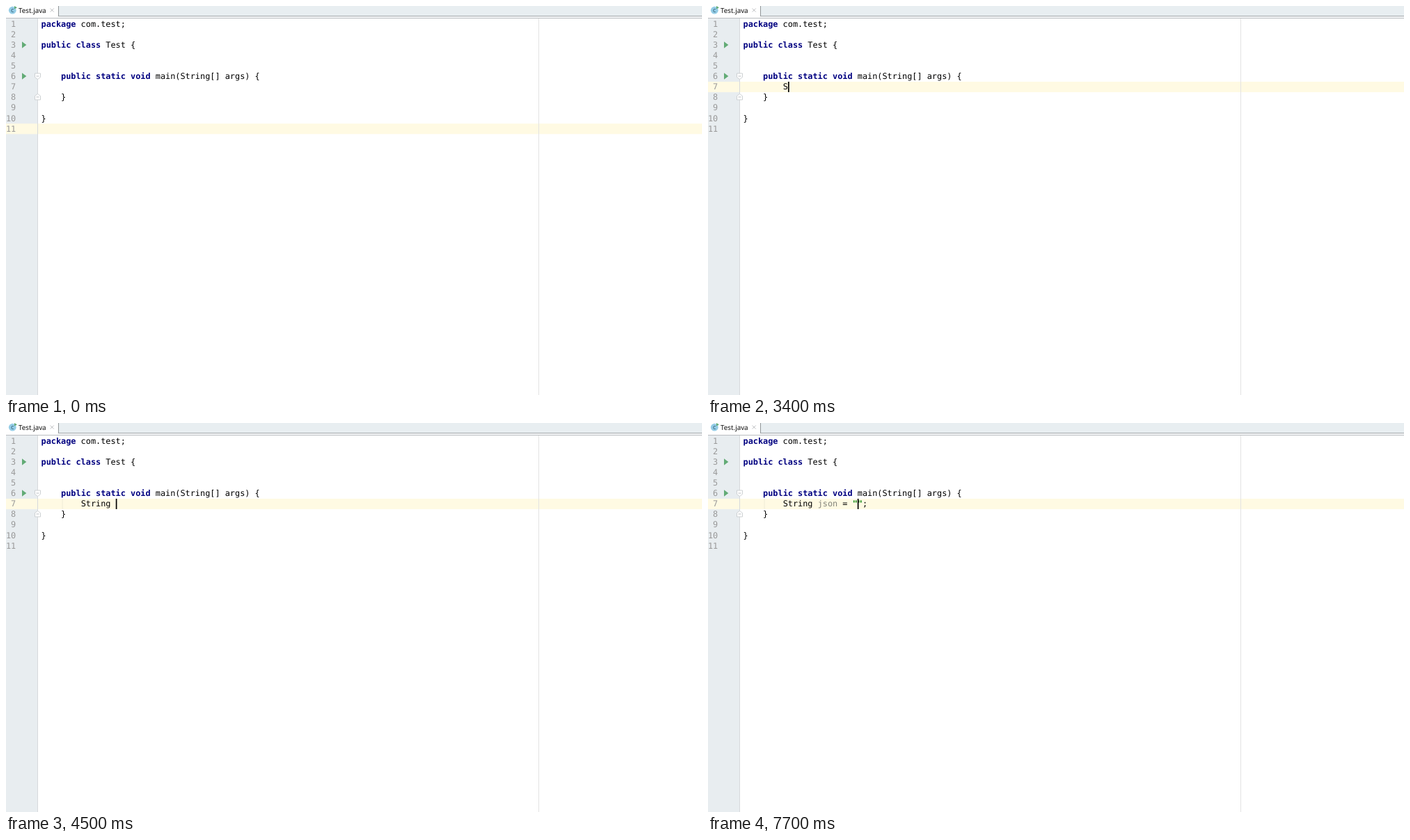
An HTML page that plays this animation: 1000x560 px, repeating every 8 s.

```html
<!DOCTYPE html>
<html lang="en">
<head>
<meta charset="utf-8">
<title>Code editor</title>
<style>
  html, body { margin: 0; width: 100%; height: 100%; overflow: hidden; background: #fff; }
  svg { display: block; width: 1000px; height: 560px; }
  text { white-space: pre; text-rendering: geometricPrecision; }
  .code { font: 11.87px "DejaVu Sans Mono", monospace; }
  .ui { font: 8.33px "Open Sans", "Noto Sans CJK SC", "Noto Sans CJK", sans-serif; }
  .tab { font-size: 9.9px; }
  .letter { font: bold 7px "Open Sans", sans-serif; text-anchor: middle; fill: #46758c; }
  .number { fill: #999; text-anchor: end; }
  .keyword { fill: #000080; font-weight: bold; }
  .string { fill: #008000; font-weight: bold; }
  .unused { fill: #85857c; }
  .match { fill: #b05cc4; }
  .package { fill: #b3bec8; }
  .selected .package { fill: #5b6a76; }
  .link { fill: #0000c0; text-decoration: underline; }
  .squiggle { fill: none; stroke: #e8443c; stroke-width: .9; }
</style>
</head>
<body>
<svg viewBox="0 0 1000 560"><g id="back"></g><g id="page"></g><g id="live"></g></svg>
<script>
const LOOP = 8000, CHAR = 7.147, LINE = 15.07, LEFT = 50.5, POPUP_ROW = 16.67;
const colX = col => LEFT + col * CHAR;
const rowY = row => 18.6 + (row - 1) * LINE;
const put = (id, markup) => document.getElementById(id).innerHTML = markup;

const rect = (x, y, w, h, fill, extra = '') =>
  `<rect x="${x}" y="${y}" width="${w}" height="${h}" fill="${fill}" ${extra}/>`;
const path = (d, attrs) => `<path d="${d}" ${attrs}/>`;
const text = (x, y, content, cls = 'code', fill = '#000') =>
  `<text x="${x}" y="${y}" class="${cls}" fill="${fill}">${content}</text>`;
const span = (cls, content) => `<tspan class="${cls}">${content}</tspan>`;
const code = (row, col, content) => text(colX(col), rowY(row) + 11.3, content);

function squiggle(x, y, width) {
  let d = `M${x} ${y + 1}`;
  for (let i = 2; i <= width; i += 2) d += `L${x + i} ${y + (i % 4 ? -1 : 1)}`;
  return path(d, 'class="squiggle"');
}

function badge(x, y, kind) {
  const fill = kind === '@' ? '#a3cd98' : '#94cce6';
  const mark = kind === '!'
    ? path(`M${x + 1} ${y - 3.5}l-3 4h2l-1 3l3-4h-2z`, 'fill="#46758c"')
    : `<text x="${x}" y="${y + 2.5}" class="letter">${kind}</text>`;
  return `<circle cx="${x}" cy="${y}" r="5.4" fill="${fill}"/>` + mark;
}

const lock = (x, y) => rect(x - .5, y, 4, 3, '#9bc39d') +
  path(`M${x - 2} ${y}v-1.3a1.4 1.4 0 0 1 2.8 0v1.3`, 'fill="none" stroke="#9bc39d"');

const fold = (y, dir) => path(
  `M41.5 ${y - 4 * dir}h8v5.5l-4 3.5l-4-3.5z`.replace('v5.5l-4 3.5l-4-3.5', `v${5.5 * dir}l-4 ${3 * dir}l-4 ${-3 * dir}`),
  'fill="#fff" stroke="#c8cccf" stroke-width=".9"') + rect(43.5, y - .5, 4, 1, '#bcc0c4');

const run = y => path(`M23 ${y - 4.7}l6.3 4.7l-6.3 4.7z`, 'fill="#62ab75"');

function drawPage() {
  const kw = word => span('keyword', word);
  let out = rect(0, 0, 1000, 14, '#e8eef1') + rect(76, 14, 924, 1, '#a4a8ab') +
    rect(0, 15, 1000, 2, '#f6f7f8') + rect(0, 0, 75, 17, '#fff') + rect(75, 0, 1, 15, '#909497') +
    rect(0, 17, 1000, 1, '#b9bdc0');
  out += badge(9.3, 6.2, 'C') + path('M12 0l4 2.3l-4 2.3z', 'fill="#62ab75"') +
    text(18, 10, 'Test.java', 'ui tab') +
    path('M63.7 3.5l5 5m0-5l-5 5', 'stroke="#b5b8ba" stroke-width=".9"');
  out += rect(45, 18, 1, 542, '#d6d9db') + rect(765, 18, 1, 542, '#e2e2e2');
  for (let row = 1; row <= 11; row++) out += text(14.2, rowY(row) + 11.3, row, 'code number', '#999');
  out += run(56) + run(101) + fold(101, 1) + fold(131, -1);
  out += code(1, 0, kw('package') + ' com.test;') +
    code(3, 0, kw('public class') + ' Test {') +
    code(6, 4, kw('public static void') + ' main(String[] args) {') +
    code(8, 4, '}') + code(10, 0, '}');
  put('page', out);
}

// Each entry: badge kind, class name, package, final marker.
const lang = 'java.lang';
const classes = [
  ['C', 'String', lang], ['C', 'System', lang, 1], ['@', 'SafeVarargs', lang],
  ['!', 'SecurityException', lang], ['C', 'SecurityManager', lang], ['C', 'Short', lang, 1],
  ['!', 'StackOverflowError', lang], ['C', 'StackTraceElement', lang, 1], ['C', 'StrictMath', lang, 1],
  ['C', 'StringBuffer', lang, 1], ['C', 'StringBuilder', lang, 1],
  ['!', 'StringIndexOutOfBoundsException', lang], ['C', 'StringJoiner', 'java.util', 1],
  ['C', 'StringTokenizer', 'java.util'], ['C', 'StringCharacterIterator', 'java.text', 1],
  ['C', 'StringReader', 'java.io'], ['C', 'StringSelection', 'java.awt.datatransfer']
];
const exact = [
  classes[0], ['C', 'String', 'com.fen.org.lumora.xpath.internal.operations'],
  ['C', 'STRING', 'javax.print.DocFlavor', 2], ...classes.slice(9)
];

function drawPopup(prefix, moveHint) {
  const list = prefix.length > 4 ? exact : classes.filter(([, name]) => name.startsWith(prefix));
  let out = rect(78.5, 124.5, 590, 188, '#ebf4fe', 'stroke="#b4babf"') +
    rect(79, 125, 578.5, 16.4, '#a0b6c6') +
    rect(657.5, 125, 10.5, 175, '#f3f5f7') + rect(660, 125, 8, 22, '#cacccd');
  list.slice(0, 11).forEach(([kind, name, pack, pin], i) => {
    const y = 133 + i * POPUP_ROW, n = prefix.length;
    out += badge(87, y + .2, kind) + lock(99.5, y + 1);
    if (pin) out += rect(82, pin === 2 ? y + 2.5 : y - 5, 2.5, 2.5, '#6f8999');
    out += `<g class="${i ? '' : 'selected'}">` + text(107.7, y + 4.2,
      span('match', name.slice(0, n)) + name.slice(n) + span('package', ` (${pack})`), 'code', '#555b61') + '</g>';
  });
  const hint = moveHint
    ? 'Ctrl+向下箭头 and Ctrl+向上箭头 will move caret down and up in the editor'
    : 'Press Alt+斜杠 to see non-imported classes';
  return out + rect(79, 300, 589, 12, '#e8edf1') +
    text(80, 309.4, hint, 'ui') + text(moveHint ? 370 : 252, 309.4, '&gt;&gt;', 'ui link') +
    rect(657.5, 300.5, 10.5, 11.5, '#dceaf6', 'stroke="#b4babf" stroke-width=".8"') +
    path('M659.7 304.5h6.2m-4.6 0v5.2m3-5.2v4.2q0 1 1.2 .8', 'fill="none" stroke="#3f7fb4" stroke-width="1.1"');
}

// Timeline: every step overrides parts of the state before it.
const steps = [
  [0, { row: 11, col: -1, text: '' }],
  [1100, { row: 7, col: 0 }], [2000, { col: -1 }], [2100, { col: 4 }], [2900, { col: 8 }]
];
const type = (time, value, extra) => steps.push([time, { text: value, col: 8 + value.length, ...extra }]);
type(3400, 'S');
steps.push([3500, { popup: true }]);
for (let n = 2; n <= 6; n++) type(3400 + n * 100, 'String'.slice(0, n));
steps.push([4100, { moveHint: true }]);
type(4500, 'String ', { popup: false, guide: true });
for (let n = 1; n <= 4; n++) type(4600 + n * 100, 'String ' + 'json'.slice(0, n));
steps.push([5100, { unused: true, shade: true }], [5200, { error: 19, tabError: true }]);
type(5300, 'String json ');
type(5400, 'String json =', { error: 21 });
type(5500, 'String json = ');
steps.push([5600, { shade: false }], [5700, { error: 22 }], [6100, { col: -1 }]);
type(6600, 'String json = ""', { col: 23 });
steps.push([6800, { col: 24 }], [6900, { error: 24 }]);
type(7100, 'String json = "";', { error: 25 });
steps.push([7400, { error: 0, tabError: false }], [7600, { col: 24 }], [7700, { col: 23 }]);

function drawState(s) {
  put('back', rect(0, 18, 45, 542, '#e8edf0') + rect(0, rowY(s.row), 1000, LINE, '#fffae3') +
    (s.shade ? rect(colX(15), rowY(7), 4 * CHAR, LINE, '#ece9dc') : ''));
  const line = s.text.replace('""', span('string', '""'))
    .replace(/ (j\w*)/, (_, name) => ' ' + (s.unused ? span('unused', name) : name));
  let out = code(7, 8, line);
  if (s.guide) out += path('M81 109.5v14', 'stroke="#d5d3c7" stroke-width=".8" stroke-dasharray="1 1"');
  if (s.error) out += squiggle(colX(s.error), 122.3, 6);
  if (s.tabError) out += squiggle(18, 12, 40);
  if (s.col >= 0) out += rect(50.8 + s.col * 7.13, 109, 1.7, 15, '#000');
  if (s.popup) out += drawPopup(s.text, s.moveHint);
  put('live', out);
}

let shown = -1;
function frame() {
  const time = performance.now() % LOOP;
  const past = steps.filter(([start]) => start <= time);
  if (past.length !== shown) {
    shown = past.length;
    drawState(Object.assign({}, ...past.map(([, change]) => change)));
  }
  requestAnimationFrame(frame);
}
drawPage();
frame();
</script>
</body>
</html>
```
